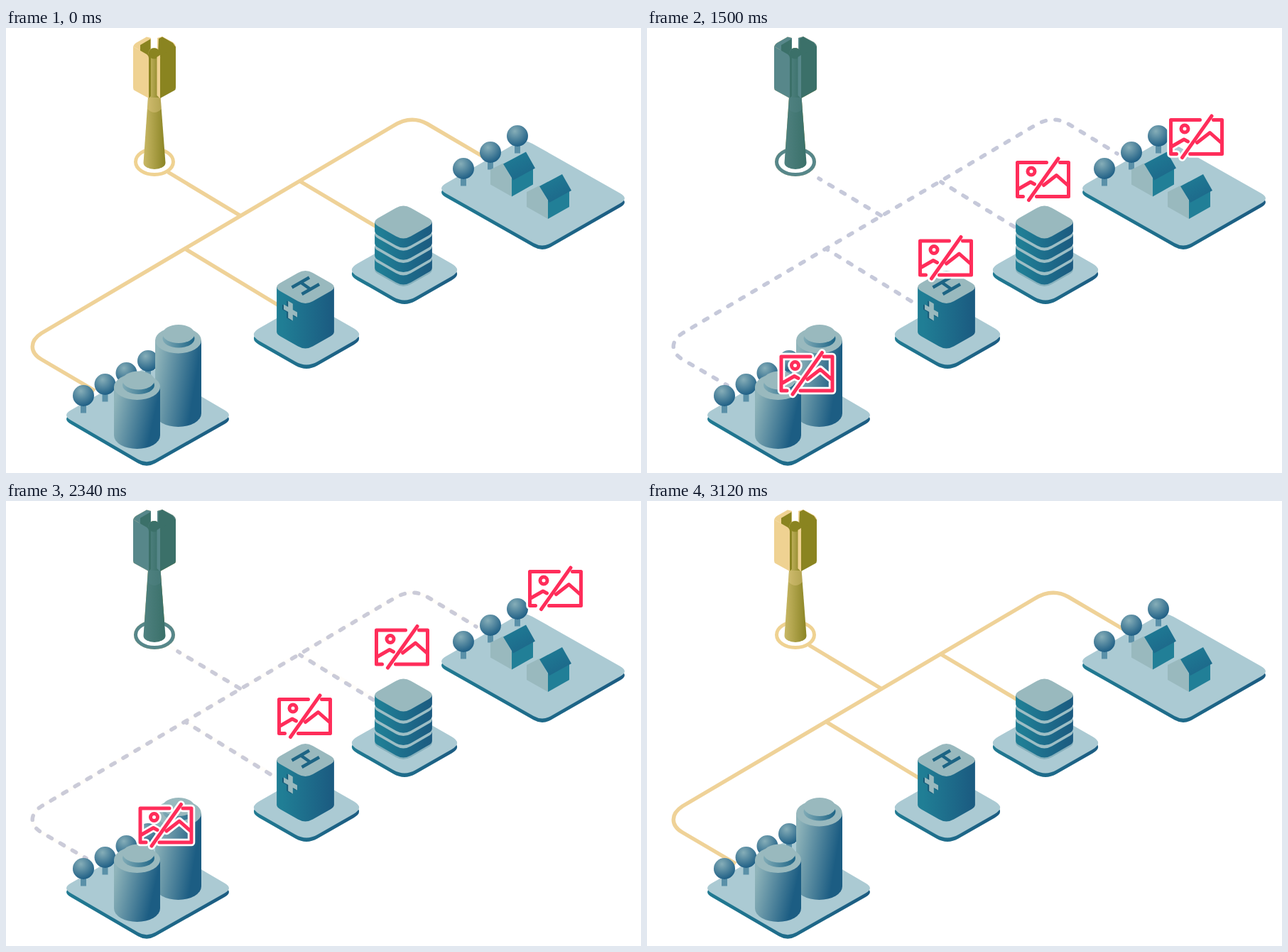
An HTML page for the animation above (3720 ms loop, 894 by 627 pixels).

```html
<!DOCTYPE html>
<html lang="en">
<head>
<meta charset="utf-8">
<title>Network outage</title>
<style>
  html, body { margin: 0; width: 100%; height: 100%; overflow: hidden; background: #fff; }
  svg { display: block; width: 100%; height: 100%; }
</style>
</head>
<body>
<svg id="stage" viewBox="0 0 894 627">
  <defs>
    <linearGradient id="wall"><stop offset=".1" stop-color="#207e95"/><stop offset="1" stop-color="#1b5a80"/></linearGradient>
    <linearGradient id="rim"><stop stop-color="#207a92"/><stop offset="1" stop-color="#1c5c82"/></linearGradient>
    <linearGradient id="roof" x1="0" y1="0" x2=".6" y2="1"><stop stop-color="#1f7f97"/><stop offset="1" stop-color="#1d688a"/></linearGradient>
    <linearGradient id="silo" x1="0" y1=".3" x2="1" y2=".6"><stop stop-color="#8fb4ba"/><stop offset=".85" stop-color="#1c5d83"/></linearGradient>
    <linearGradient id="cap"><stop stop-color="#80abb6"/><stop offset="1" stop-color="#1d6486"/></linearGradient>
    <radialGradient id="leaf" cx=".38" cy=".28" r=".75"><stop stop-color="#86aeb8"/><stop offset="1" stop-color="#1c5d84"/></radialGradient>
    <linearGradient id="goldMast"><stop stop-color="#c9b866"/><stop offset="1" stop-color="#8a8424"/></linearGradient>
    <linearGradient id="tealMast"><stop stop-color="#4f8180"/><stop offset="1" stop-color="#3a7069"/></linearGradient>
  </defs>
</svg>
<script>
const stage = document.getElementById('stage');
const LIGHT = '#99b9be', GROUND = '#abcad3';

const path = (d, fill, extra = '') => `<path d="${d}" fill="${fill}" ${extra}/>`;
const poly = (points, fill) => path(`M${points}Z`, fill);
const ellipse = (cx, cy, rx, ry, fill) =>
  `<ellipse cx="${cx}" cy="${cy}" rx="${rx}" ry="${ry}" fill="${fill}"/>`;
const group = (id, content) => `<g id="${id}">${content}</g>`;

// Polygon outline whose corners are cut back by `cut` and rounded
function rounded(points, cut) {
  const toward = (a, b) => {
    const k = cut / Math.hypot(b[0] - a[0], b[1] - a[1]);
    return [a[0] + (b[0] - a[0]) * k, a[1] + (b[1] - a[1]) * k];
  };
  return points.map((p, i) => {
    const before = points.at(i - 1), after = points[(i + 1) % points.length];
    return `${i ? 'L' : 'M'}${toward(p, before)}Q${p} ${toward(p, after)}`;
  }).join('') + 'Z';
}

const rhombus = (cx, cy, w, h) => [[cx, cy - h], [cx + w, cy], [cx, cy + h], [cx - w, cy]];

const platform = (points, cut) =>
  path(rounded(points.map(([x, y]) => [x, y + 5.5]), cut), 'url(#rim)') +
  path(rounded(points, cut), GROUND);

const blockFace = (cx, cy) => rounded(rhombus(cx, cy, 45.5, 26), 12);

const block = (cx, cy, height, top = LIGHT) =>
  path(`${blockFace(cx, cy + height)}M${cx - 40.4} ${cy}h80.8v${height}h-80.8Z`, 'url(#wall)') +
  path(blockFace(cx, cy), top);

const tree = (x, y) =>
  `<rect x="${x - 4}" y="${y + 8}" width="8" height="16.5" fill="#5a90a8"/>` +
  ellipse(x, y, 15, 15, 'url(#leaf)');

const house = (x, y) => `<g transform="translate(${x} ${y})">` +
  poly('0,7 18,-2 30,20 30,45 0,28', LIGHT) +
  poly('30,18 60,4 60,28 30,45', '#217f97') +
  poly('18,-1 50,-18 63,5 32,22', 'url(#roof)') + '</g>';

const silo = (cx, top, bottom, capX) =>
  path(`M${cx - 32.5} ${top}V${bottom}a32.5 19 0 0 0 65 0V${top}Z`, 'url(#silo)') +
  ellipse(cx, top, 32.5, 18.5, LIGHT) +
  ellipse(capX, top - 2.5, 22.5, 13, 'url(#cap)') +
  ellipse(capX, top - 9, 22.5, 13, LIGHT);

function hospital() {
  const cross = 'M-3.3-12h6.6v8.5H9.5v7H3.3V12h-6.6V3.5h-6.2v-7h6.2Z';
  const skewed = x => `transform="matrix(1 .577 0 1 ${x} 398.5)"`;
  return platform(rhombus(423, 432, 82, 47), 18) + block(421.5, 365, 63.5) +
    path('M402.500 365.500L427 351.500M416.500 375L441 361M415 358.500L428.500 368', 'none',
      'stroke="#1d6484" stroke-width="4.500"') +
    path(cross, '#165a78', skewed(398.5)) + path(cross, LIGHT, skewed(400.5));
}

function office() {
  let floors = path(blockFace(559.5, 341), '#86b0bc');
  for (let i = 3; i >= 0; i--)
    floors += block(559.5, 273.5 + 17.3 * i, 13, i ? '#9dbec5' : LIGHT);
  return platform(rhombus(561, 341, 82, 47), 18) + floors;
}

const village = () =>
  platform([[729, 156], [877, 240], [755, 310], [607, 226]], 14) +
  tree(720, 152) + tree(682, 175) + tree(644, 198) +
  house(682, 192.5) + house(733, 224);

const plant = () =>
  platform([[201, 476], [320, 545.5], [198, 614.7], [79, 545.5]], 14) +
  [[200, 469], [169.5, 486], [139.5, 502], [109, 518]].map(p => tree(...p)).join('') +
  silo(242.5, 440, 543, 243) + silo(184.5, 505.5, 574, 186.5);

const tower = (light, dark, mast) =>
  `<ellipse cx="209" cy="188.500" rx="26.500" ry="18" fill="#fff" stroke="${light}" stroke-width="5"/>` +
  // back wings
  path('M179 26Q180 23 183 21L198 12.500L204 14V44L186 30Z', light) +
  path('M189 24L203.500 15.500V50L189 40Z', dark) +
  path('M239 26Q238 22 235 20L220 12L213 14V44L232 30Z', light) +
  path('M215 15L220 12.500L235 21L239 27L217 42L214 40Z', dark) +
  // mast
  path('M200 97L193.500 190A15.500 9 0 0 0 224.500 190L217.500 97Z', mast) +
  path('M200.500 96L199 114Q209 124 219 114L217.500 96Z', light, 'opacity=".35"') +
  path('M200.500 36a8 8 0 0 1 16 0L215 98H202Z', mast) +
  ellipse(208.5, 36, 8, 7.500, dark) +
  // front wings
  path('M200 37L204 39V96L200 99.500Z', dark) +
  path('M179 26L198 37Q201 39 201 43V99L181 88Q179 87 179 84Z', light) +
  path('M217 38L212.500 41V95L217 99.500Z', light) +
  path('M239 26L220 37Q217 39 217 43V99L237 88Q239 87 239 84Z', dark);

const trunkLine = 'L50 467C33 457 33 441 50 430L545 138Q570 122 593 135';
const solidLines = `M125 511${trunkLine}L673 182M228 203L330 264.500M252 311L384 391M414 216L523 281`;
const dashedLines = [`M113 503.500${trunkLine}L662 177`,
  'M242 212L330 264.500', 'M252 311L377 388', 'M414 217L517 280'].join('');

const ICON = 'M-28 24H-36V-24H5M24-24H36V24H-9M21.500-29.500L-20 29M-34 13L-17.500 3.500L-12 6.500' +
  'M1 8L19-6L36 9M-21.500-11.500a5 5 0 1 0 10 0a5 5 0 1 0-10 0';
const stroke = (color, width) =>
  path(ICON, 'none', `stroke="${color}" stroke-width="${width}" stroke-linecap="round" stroke-linejoin="round"`);

// Resting place of each alert and how far below it starts
const alerts = [
  { x: 773.5, y: 123.5, rise: 30 },
  { x: 557.5, y: 206, rise: 7.5 },
  { x: 420.5, y: 303.5, rise: 20.5 },
  { x: 225, y: 457, rise: 30 }
];

stage.innerHTML +=
  path(dashedLines, 'none', 'id="dashes" stroke="#c6c9da" stroke-width="5.500" stroke-linecap="round" stroke-dasharray="6 13.700" stroke-dashoffset="3"') +
  path(solidLines, 'none', 'id="solid" stroke="#efd298" stroke-width="5.500"') +
  tower('#efd292', '#8a8420', 'url(#goldMast)') +
  group('offline', tower('#57878a', '#3b7069', 'url(#tealMast)')) +
  village() + office() + hospital() + plant() +
  group('alerts', alerts.map(() => `<g>${stroke('#fff', 10.5)}${stroke('#ff2d5a', 5)}</g>`).join(''));

const [dashes, solid, offline, alertLayer] =
  ['dashes', 'solid', 'offline', 'alerts'].map(id => document.getElementById(id));

const LOOP = 3720, STEP = 30;
const ramp = (t, from, to) => Math.min(1, Math.max(0, (t - from) / (to - from)));

function draw(now) {
  const t = Math.floor((now % LOOP) / STEP) * STEP;
  const broken = ramp(t, 0, 660) - ramp(t, 2310, 2970);
  dashes.style.opacity = broken;
  solid.style.opacity = 1 - broken;
  offline.style.opacity = ramp(t, 0, 540) - ramp(t, 2670, 3120);
  alertLayer.style.opacity = t < 1500 ? 0 : 1 - ramp(t, 2340, 2970);
  const below = (1 - ramp(t, 1500, 1740)) ** 2;
  alerts.forEach(({ x, y, rise }, i) =>
    alertLayer.children[i].setAttribute('transform', `translate(${x} ${y + rise * below})`));
}

let start;
function tick(now) {
  start ??= now;
  draw(now - start);
  requestAnimationFrame(tick);
}
draw(0);
requestAnimationFrame(tick);
</script>
</body>
</html>
```
